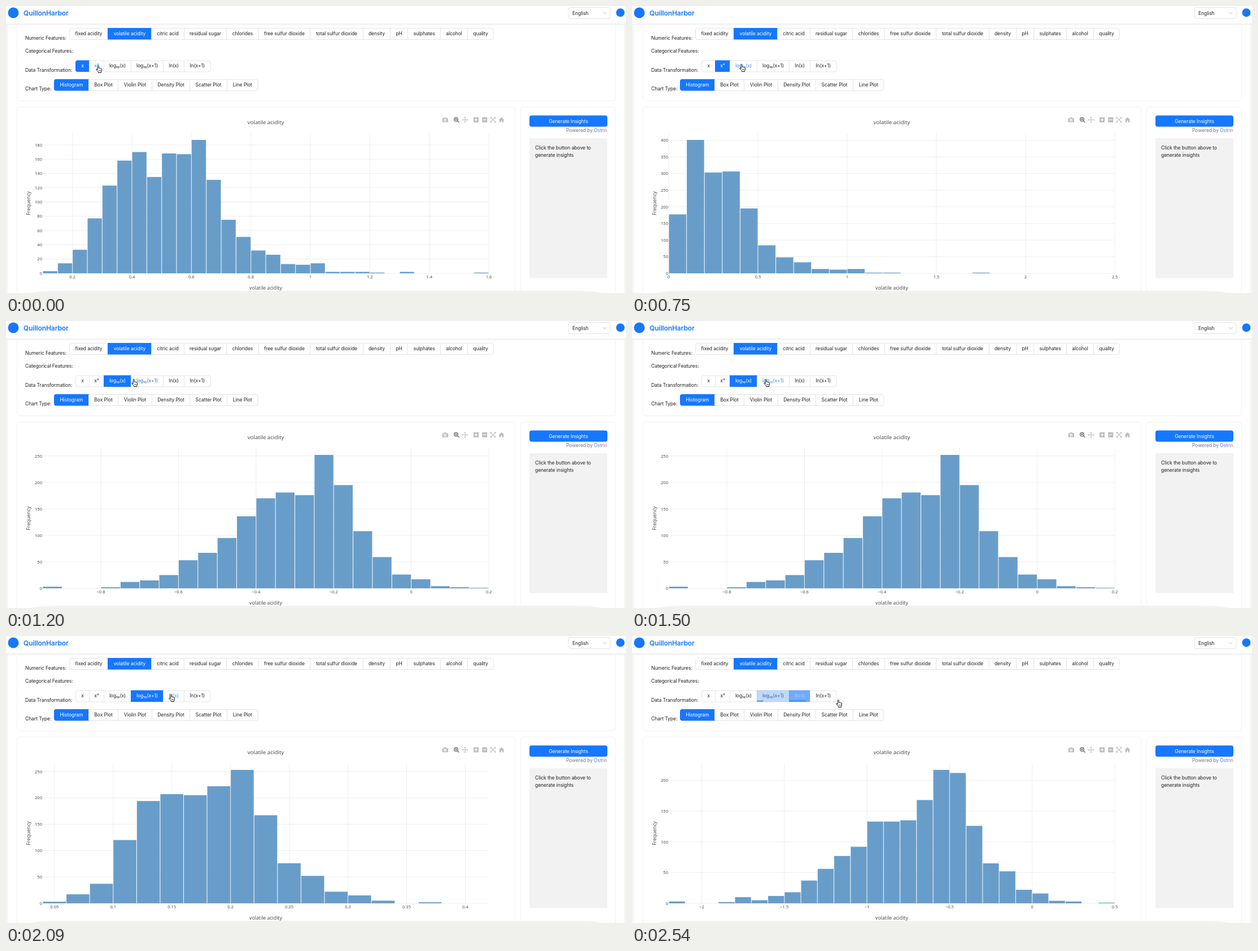
These frames come from a looping animation (1098 by 510 pixels, 2690 ms). An HTML page:

```html
<!DOCTYPE html>
<html lang="en">
<head>
<meta charset="utf-8">
<title>Histogram transformations</title>
<style>
  html, body { margin: 0; width: 100%; height: 100%; overflow: hidden; background: #fff; }
  svg { display: block; width: 100%; height: 100%; }
  text { font: 8.6px Inter, "Noto Sans", sans-serif; letter-spacing: -.1px; fill: #222; }
  .mid { text-anchor: middle; }
  .brand { font-size: 12px; font-weight: 600; fill: #1677ff; }
  .chart text { font: 7.6px "Open Sans", "Noto Sans", sans-serif; letter-spacing: 0; fill: #444; }
  .chart .title { font-size: 9.8px; }
  .chart .axis { font-size: 8.75px; }
  .end { text-anchor: end; }
  .line { fill: none; stroke: #e4e4e4; }
  .card { fill: #fff; stroke: #f2f2f2; }
  .grid { stroke: #eee; }
  .bar { fill: #699dc9; }
  .icon { fill: none; stroke: #bdbdbd; stroke-width: 1.5; }
  .icon .solid { fill: #bdbdbd; stroke: none; }
  .icon .cut { stroke: #fff; stroke-width: 1.3; }
</style>
</head>
<body>
<svg id="stage" viewBox="0 0 1098 510" preserveAspectRatio="none">
  <defs>
    <linearGradient id="shade" x2="0" y2="1">
      <stop stop-color="#e6e6e6"/><stop offset="1" stop-color="#fff" stop-opacity="0"/>
    </linearGradient>
    <linearGradient id="tint">
      <stop stop-color="#3f7fe8"/><stop offset=".55" stop-color="#7d74cf"/><stop offset="1" stop-color="#d5647a"/>
    </linearGradient>
  </defs>
  <rect width="1098" height="510" fill="#fff"/>
  <path d="M0 32h3.5v478H0zM1094.5 32h3.5v478h-3.5z" fill="#f6f6f6"/>
  <rect class="card" x="19.5" y="0" width="1060" height="168.5" rx="5"/>
  <rect class="card" x="19.5" y="179.5" width="882" height="360" rx="5"/>
  <rect class="card" x="911.5" y="179.5" width="168" height="360" rx="5"/>

  <rect width="1098" height="32" fill="#fff"/>
  <rect y="31.5" width="1098" height="4" fill="url(#shade)"/>
  <circle cx="13" cy="12" r="9.5" fill="#1677ff"/>
  <text class="brand" x="31" y="16.6">QuillonHarbor</text>
  <rect class="line" x="996" y="2.5" width="74" height="20" rx="4"/>
  <text x="1003" y="15.6">English</text>
  <path d="M1057 10.8l3.2 3.6 3.2-3.6" fill="none" stroke="#c4c4c4"/>
  <circle cx="1088" cy="11.7" r="7.5" fill="#1677ff"/>

  <text x="34" y="59.8">Numeric Features:</text>
  <text x="34" y="83.2">Categorical Features:</text>
  <text x="34" y="116.8">Data Transformation:</text>
  <text x="34" y="150.2">Chart Type:</text>
  <g id="features"></g>
  <g id="transforms"></g>
  <g id="kinds"></g>

  <g class="icon">
    <path class="solid" d="M772.5 199.5h2.5l1-1.5h3.5l1 1.5h2.5v7h-10.5z"/>
    <circle class="cut" cx="777.7" cy="202.8" r="1.8"/>
    <g stroke="#777"><circle cx="797" cy="201.5" r="3.3"/><path d="M799.5 204l3 3M795.3 201.5h3.4M797 199.8v3.4" /></g>
    <path d="M808 202.3h10M813 197.3v10" stroke-width="1.1"/>
    <path d="M809.5 200.8l-1.5 1.5 1.5 1.5M816.5 200.8l1.5 1.5-1.5 1.5M811.5 198.8l1.5-1.5 1.5 1.5M811.5 205.8l1.5 1.5 1.5-1.5" stroke-width="1"/>
    <path class="solid" d="M828 197.7h9v9h-9zM843.2 197.7h9v9h-9z"/>
    <path class="cut" d="M829.8 202.2h5.4M832.5 199.5v5.4M845 202.2h5.4"/>
    <path d="M858.5 198.2l8 8M866.5 198.2l-8 8" stroke-width="1.1"/>
    <path d="M858 200v-2.3h2.3M864.7 197.7h2.3v2.3M867 204.4v2.3h-2.3M860.3 206.7h-2.3v-2.3" stroke-width="1.1"/>
    <path class="solid" d="M872.5 202.5l5-4.7 5 4.7h-1.3v4.2h-2.7v-3h-2v3h-2.7v-4.2z"/>
  </g>
  <g class="chart">
    <text class="mid title" x="460" y="210.2">volatile acidity</text>
    <text class="mid axis" x="460" y="504.4">volatile acidity</text>
    <text class="mid axis" transform="translate(43.2 350.5) rotate(-90)">Frequency</text>
    <g id="plot"></g>
  </g>

  <rect x="927" y="194.5" width="138" height="20" rx="4" fill="#1677ff"/>
  <text class="mid" x="996" y="207.7" style="fill:#fff">Generate Insights</text>
  <text x="992" y="223.6" style="fill:#777">Powered by</text>
  <text x="1041" y="224" style="fill:url(#tint)">Ostrin</text>
  <rect x="927" y="235" width="138" height="248.5" rx="1" fill="#f2f2f2"/>
  <text x="937" y="254.8">Click the button above to</text>
  <text x="937" y="268.4">generate insights</text>
  <rect x="35" y="506" width="1030" height="60" rx="60" ry="8" fill="#f2f2f2"/>

  <g id="cursor" fill="#fff" stroke="#111" stroke-linejoin="round">
    <path d="M3.2 8.4V1.6a1 1 0 0 1 2.1 0V5.4q1-.6 1.9.2 1-.4 1.7.5 1.5-.3 1.6 1.2v2.3q0 1.6-1 2.7v1.2H4.6v-1.2Q3.2 11 1 8.2q-.6-1.2.5-1.4.9 0 1.7 1.6z"/>
    <path d="M5.7 8.6v2.6M7.2 8.6v2.6M8.7 8.6v2.6" stroke-width=".6"/>
  </g>
</svg>

<script>
const BLUE = '#1677ff', INK = '#222', LOOP = 2690;
const LEFT = 65, WIDTH = 790, BASE = 475, TOP = 226;
const el = id => document.getElementById(id);

// Segmented control; looks maps a button index to [fill opacity, text colour, underline width].
function group(top, edges, labels, looks) {
  const first = edges[0], last = edges[edges.length - 1];
  let out = `<rect class="line" x="${first}" y="${top + .5}" width="${last - first}" height="20" rx="4" style="fill:#fff"/>`;
  labels.forEach((label, i) => {
    const a = edges[i], b = edges[i + 1];
    const [alpha, colour, under] = looks[i] || [0, INK, 0];
    if (i) out += `<path class="line" d="M${a} ${top + .5}v20"/>`;
    if (alpha) {
      const r = i ? 0 : 4;
      out += `<path d="M${b + .5} ${top}H${a - .5 + r}q${-r} 0 ${-r} ${r}v${20.5 - 2 * r}q0 ${r} ${r} ${r}H${b + .5}z" fill="${BLUE}" fill-opacity="${alpha}"/>`;
    }
    if (under) out += `<rect x="${a + (i ? 0 : 2)}" y="${top + 18.3}" width="${under}" height="1.5" fill="#2b7fe8"/>`;
    out += `<text class="mid" x="${(a + b) / 2}" y="${top + 12.8}" style="fill:${colour}">${label}</text>`;
  });
  return out;
}

const on = [1, '#fff', 0], hover = [0, '#3f8dff', 0];

el('features').innerHTML = group(39,
  [112.5, 180.5, 257.5, 315.5, 390.5, 447.5, 538.5, 632.5, 680.5, 711.5, 769.5, 817.5, 863.5],
  ['fixed acidity', 'volatile acidity', 'citric acid', 'residual sugar', 'chlorides', 'free sulfur dioxide',
   'total sulfur dioxide', 'density', 'pH', 'sulphates', 'alcohol', 'quality'], { 1: on });
el('kinds').innerHTML = group(130, [85.5, 146.5, 198.5, 258.5, 325.5, 391.5, 446],
  ['Histogram', 'Box Plot', 'Violin Plot', 'Density Plot', 'Scatter Plot', 'Line Plot'], { 0: on });

const transforms = looks => group(96.5, [123.5, 147.5, 173.5, 221.5, 278.5, 315.5, 362],
  ['x', 'x²', 'log₁₀(x)', 'log₁₀(x+1)', 'ln(x)', 'ln(x+1)'], looks);

// from, to: axis range; bin: bar width; tick, step: axis spacing
const charts = [
  { from: .1, to: 1.6, bin: .05, tick: .2, step: 20, counts: [3, 14, 33, 77, 123, 158, 170, 135, 168, 167, 187,
    131, 75, 51, 32, 26, 13, 12, 14, 2, 2, 2, 1, 0, 2, 0, 0, 0, 0, 1] },
  { from: 0, to: 2.5, bin: .1, tick: .5, step: 50, counts: [177, 401, 303, 306, 195, 84, 48, 33, 13, 11, 13, 2, 2,
    0, 0, 0, 0, 2] },
  { from: -.95, to: .2, bin: .05, tick: .2, step: 50, counts: [3, 0, 0, 2, 12, 15, 25, 53, 67, 95, 136, 170, 181,
    176, 252, 195, 108, 59, 26, 17, 4, 2, 1] },
  { from: .04, to: .42, bin: .02, tick: .05, step: 50, counts: [3, 17, 37, 120, 194, 207, 205, 222, 253, 167, 76,
    52, 22, 15, 5, 0, 2] },
  { from: -2.2, to: .5, bin: .1, tick: .5, step: 50, counts: [3, 0, 0, 2, 10, 5, 12, 18, 37, 56, 77, 92, 133, 133,
    135, 168, 217, 212, 126, 65, 52, 22, 16, 4, 3, 0, 1] }
];

function histogram({ from, to, bin, tick, step, counts }) {
  const max = Math.max(...counts);
  const px = v => LEFT + (v - from) / (to - from) * WIDTH;
  const py = n => BASE - n / max * (BASE - TOP) * .952;
  let out = '';
  for (let k = Math.ceil(from / tick - 1e-6); k * tick <= to + 1e-6; k++) {
    const x = px(k * tick), label = String(+(k * tick).toFixed(2)).replace('-', '−');
    out += `<path class="grid" d="M${x} ${TOP}V${BASE}"/><text class="mid" x="${x}" y="483.6">${label}</text>`;
  }
  for (let n = 0; n <= max; n += step) {
    out += `<path class="grid" d="M${LEFT} ${py(n)}h${WIDTH}"/><text class="end" x="64" y="${py(n) + 2.8}">${n}</text>`;
  }
  counts.forEach((n, i) => {
    if (!n) return;
    const x = px(from + i * bin), w = bin / (to - from) * WIDTH;
    out += `<rect class="bar" x="${x + .5}" y="${py(n)}" width="${w - 1}" height="${BASE - py(n)}"/>`;
  });
  return out;
}

const plots = charts.map(histogram);

// [start ms, chart, cursor x, cursor y, button looks]
const steps = [
  [0, 0, 159, 105, { 0: on, 1: hover }],
  [300, 1, 159, 105, { 0: [.43, '#6f88a8', 7], 1: [.44, '#8fbcfb', 14] }],
  [450, 1, 171, 104, { 1: [.97, '#fff', 0] }],
  [600, 1, 187, 103, { 1: on, 2: hover }],
  [750, 1, 190, 103, { 1: on, 2: hover }],
  [900, 2, 190, 103, { 1: [.86, '#fff', 0], 2: [.1, '#4b95ff', 11] }],
  [1050, 2, 190, 103, { 1: [.06, INK, 0], 2: [.95, '#fff', 0] }],
  [1200, 2, 222, 103, { 2: on, 3: [0, '#3c6fb5', 0] }],
  [1350, 2, 233, 103, { 2: on, 3: hover }],
  [1790, 3, 233, 103, { 2: [.54, '#6688b8', 20], 3: [.39, '#83a2cc', 33] }],
  [1940, 3, 281, 103, { 2: [.05, INK, 0], 3: [.96, '#fff', 0] }],
  [2090, 3, 288, 103, { 3: on, 4: hover }],
  [2390, 3, 288, 103, { 3: on, 4: [0, '#3f8dff', 2] }],
  [2540, 4, 361, 113, { 3: [.28, '#4c5f80', 11], 4: [.61, '#a9cdff', 30] }]
];

let shownStep, shownChart;
function draw() {
  const now = performance.now() % LOOP;
  const step = steps.filter(s => s[0] <= now).pop();
  if (step !== shownStep) {
    const [, chart, x, y, looks] = step;
    if (chart !== shownChart) el('plot').innerHTML = plots[chart];
    el('transforms').innerHTML = transforms(looks);
    el('cursor').setAttribute('transform', `translate(${x} ${y})`);
    shownStep = step;
    shownChart = chart;
  }
  requestAnimationFrame(draw);
}
draw();
</script>
</body>
</html>
```
